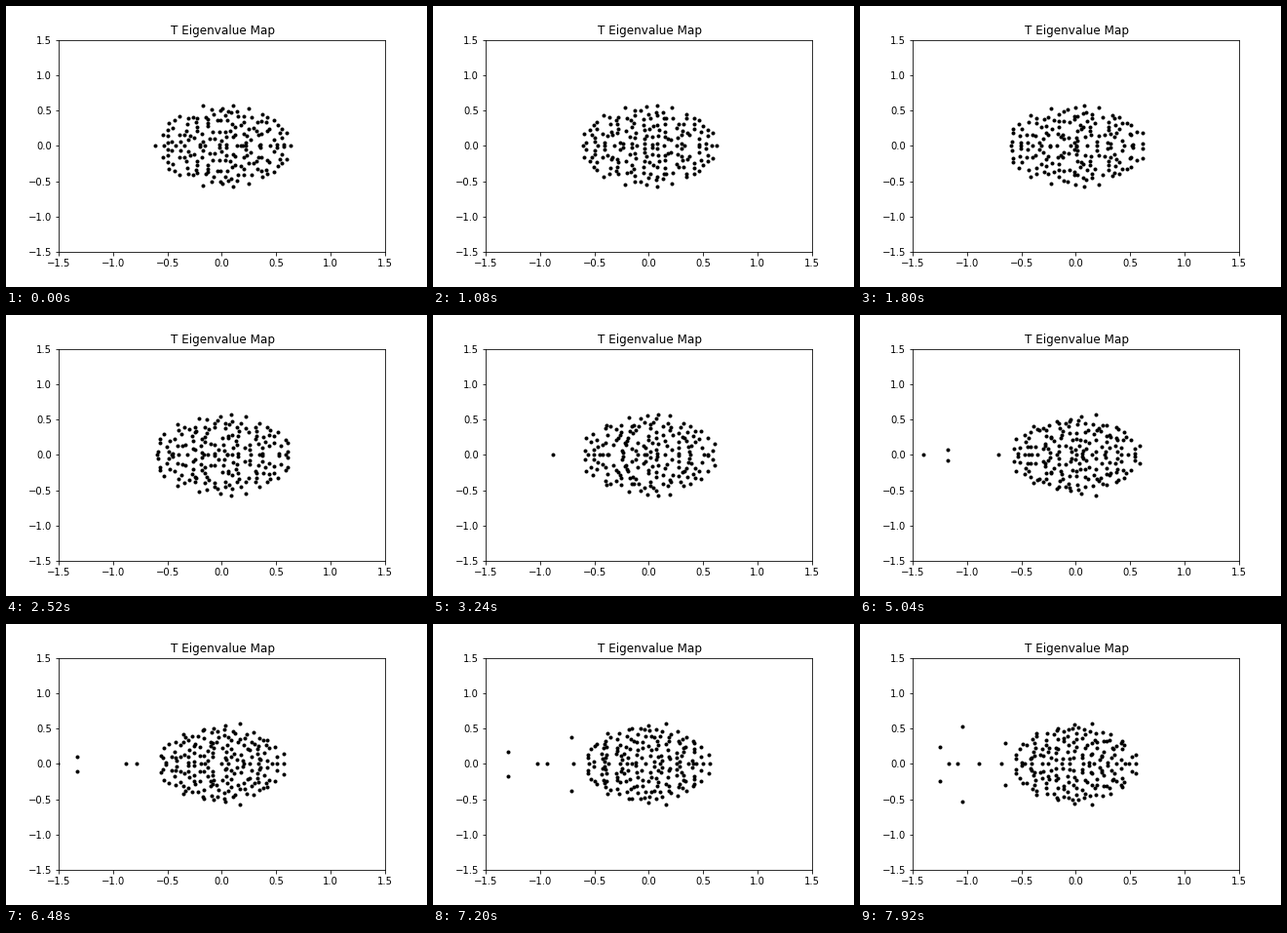
Write a matplotlib script that moves like this. It is 432 px wide and 288 px high and loops after 8000 ms.

```python
import numpy as np
import matplotlib.pyplot as plt
from matplotlib.animation import FuncAnimation

STEPS, HOLD, FRAMES, INTERVAL = 23, 9, 200, 40
SIZE = 190      # eigenvalues in the central disc
DRIFT = 0.09    # how far the matrix turns per step
HEIGHT = 0.57

# Paths of eigenvalues that leave the disc, as (step, place) key points
PATHS = [
    [(9, -0.886), (10, -1.427), (14, -1.40), (15, -1.505), (19, -1.505)],
    [(11, -0.834), (14, -1.175 + 0.075j), (16, -1.334 + 0.1j),
     (18, -1.33 + 0.1j), (22, -1.25 + 0.24j)],
    [(11, -0.69), (14, -0.71), (18, -0.88), (22, -1.17)],
    [(16, -0.65), (18, -0.78), (22, -1.09)],
    [(19, -0.60), (22, -0.89)],
    [(19, -0.55 + 0.3j), (22, -1.04 + 0.535j)],
    [(20, -0.50 + 0.25j), (22, -0.645 + 0.3j)],
    [(20, -0.55), (22, -0.685)],
]


def disc(w, k):
    """Eigenvalues of w, fitted to a disc that slowly narrows."""
    z = np.linalg.eigvals(w)
    t = k / (STEPS - 1)
    left, right = -0.61 + 0.06 * t, 0.635 - 0.08 * t
    x = np.interp(z.real, [z.real.min(), z.real.max()], [left, right])
    return x + 1j * z.imag * HEIGHT / z.imag.max()


def escaped(k):
    places = []
    for path in PATHS:
        steps, keys = zip(*path)
        if steps[0] <= k <= steps[-1]:
            z = complex(np.interp(k, steps, keys))
            places += [z, z.conjugate()] if z.imag else [z]
    return places


def spectra():
    rng = np.random.default_rng(12)
    w = rng.standard_normal((SIZE, SIZE))
    result = []
    for k in range(STEPS):
        result.append(np.append(disc(w, k), escaped(k)))
        noise = rng.standard_normal((SIZE, SIZE))
        w = np.cos(DRIFT) * w + np.sin(DRIFT) * noise
    return result


points = spectra()

fig = plt.figure(figsize=(6, 4), dpi=72, facecolor="white")
fig.subplots_adjust(left=0.125, right=0.9, bottom=0.125, top=0.88)
ax = fig.add_subplot()
ax.set_title("T Eigenvalue Map", x=0.503)
ax.set_xlim(-1.5, 1.5)
ax.set_ylim(-1.5, 1.5)
dots, = ax.plot([], [], "k.")


def update(i):
    z = points[i // HOLD]
    dots.set_data(z.real, z.imag)
    return dots,


anim = FuncAnimation(fig, update, frames=FRAMES, interval=INTERVAL,
                     repeat=True, repeat_delay=0)
plt.show()
```
